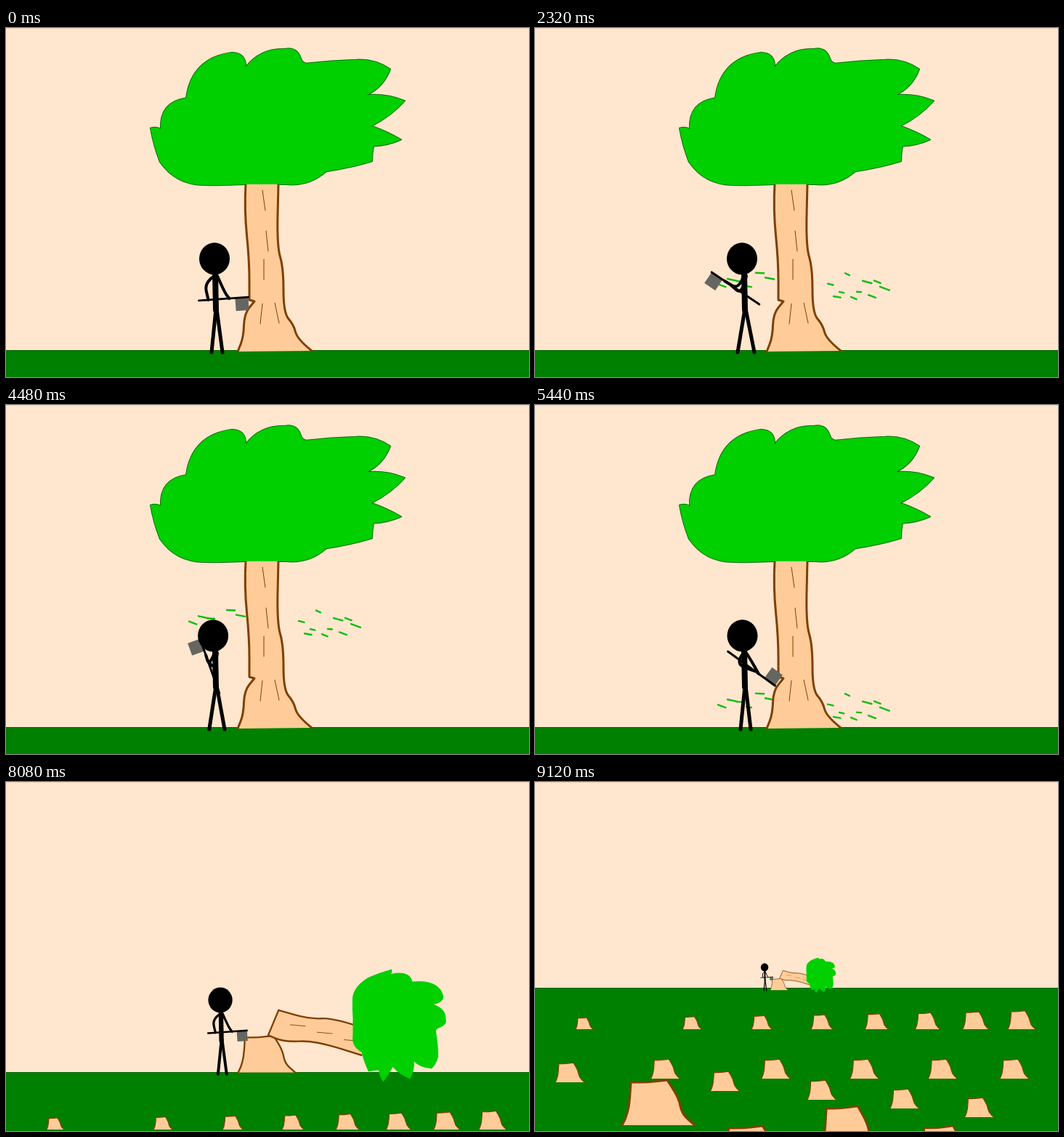
These frames come from a looping animation (720 by 480 pixels, 9200 ms). An HTML page with a canvas:

```html
<!DOCTYPE html>
<html lang="en">
<head>
<meta charset="utf-8">
<title>Chopping a tree</title>
<style>
html, body { margin: 0; width: 100%; height: 100%; overflow: hidden; background: #ffe6cf; }
canvas { display: block; }
</style>
</head>
<body>
<canvas id="stage" width="720" height="480"></canvas>
<script>
const g = document.getElementById('stage').getContext('2d');
const LOOP = 9200, STEP = 80, CHOP = 1280, FALL = 5722, ZOOM = 7680;
const BROWN = '#7f4000', WOOD = '#ffcc99', LEAF = '#00cf00';
const rad = Math.PI / 180;
const clamp = v => Math.max(0, Math.min(1, v));
const mix = (a, b, k) => a.map((v, i) => v + (b[i] - v) * k);
const rnd = n => { const v = Math.sin(n * 12.9898) * 43758.5453; return v - Math.floor(v); };

// Corners of the crown, clockwise, each with the bulge of the edge leading to it.
const crown = bulgePath([
  [199,137,0], [213,138,.2], [248,95,.45], [311,32,.38], [330,52,.5], [383,27,.25], [406,40,.45],
  [413,47,-.3], [482,42,.02], [529,55,.17], [497,91,.2], [549,99,.12], [503,134,.1], [544,153,.05],
  [506,162,.1], [504,183,-.05], [441,197,.04], [385,215,.22], [330,215,0], [274,216,.02],
  [212,184,.27], [199,137,.05]]);

const trunkLeft = [330,214, 328,250, 335,320, 335,374, 335,374, 342,376, 342,376, 328,393, 327,425, 319,445];
const trunkRight = [421,444, 401,428, 396,408, 382,392, 382,330, 373,300, 375,214];
const log = [515,284, 455,295, 418,319, 364,332, 364,332, 370,379, 370,379, 400,375, 444,347, 528,328];
const stumpEdge = [0,1, .09,.75, .12,.05, .12,.05, .35,.05, .62,0, .62,0, .78,.4, .82,.75, 1,1];

// head x, feet x, hands along the handle, elbows, axe: centre, angle, length, blade side
const ready = [287, 283, 298, -21, 8, 273, 350, 301, 364, 299.5, 372.5, -4, 68, 1];
const drawn = [285.5, 283, 297, 6, 12, 275, 356, 298, 352, 298, 362.5, 36, 80, -1];
const raised = [285, 279, 302, 18, 7, 281, 360, 285, 367, 276, 358, -146, 79, -1];

function bulgePath(points) {
  const path = new Path2D();
  points.forEach(([x, y, bulge], i) => {
    if (!i) return path.moveTo(x, y);
    const [px, py] = points[i - 1];
    path.quadraticCurveTo((px + x) / 2 + bulge * (y - py), (py + y) / 2 - bulge * (x - px), x, y);
  });
  return path;
}

// Smooth curve through the middles of the point list; a doubled point is a corner.
function trace(p) {
  const n = p.length;
  g.lineTo(p[0], p[1]);
  for (let i = 2; i < n - 2; i += 2)
    g.quadraticCurveTo(p[i], p[i + 1], (p[i] + p[i + 2]) / 2, (p[i + 1] + p[i + 3]) / 2);
  g.lineTo(p[n - 2], p[n - 1]);
}

function line(p, width, color = '#000') {
  g.beginPath();
  trace(p);
  g.lineWidth = width;
  g.strokeStyle = color;
  g.stroke();
}

function fill(color, ...parts) {
  g.beginPath();
  parts.forEach(trace);
  g.fillStyle = color;
  g.fill();
}

function around(x, y, change, paint) {
  g.save();
  g.translate(x, y);
  change();
  g.translate(-x, -y);
  paint();
  g.restore();
}

function stump(mid, base, w, h = w * .67) {
  const p = stumpEdge.map((v, i) => i % 2 ? base - h + v * h : mid + (v - .5) * w);
  fill(WOOD, p);
  line(p, Math.max(1.2, w * .03), BROWN);
}

function standingTrunk() {
  fill(WOOD, trunkLeft, trunkRight);
  line(trunkLeft, 3, BROWN);
  line(trunkRight, 3, BROWN);
  for (const [x, y, lean] of [[353,223,4], [358,279,3], [355,318,0], [353,379,-3], [370,378,6]])
    line([x, y, x + lean, y + 28], 1, BROWN);
}

function fallenLog() {
  fill(WOOD, log);
  line(log, 3, BROWN);
  for (let i = 0; i < 3; i++) {
    const x = 394 + 47 * i, y = 344 - 12 * i;
    line([x, y, x + 24, y - 11], 1, BROWN);
  }
}

function tree(t) {
  const tilt = t < FALL ? 0 : Math.min(101.5, 1.02e-4 * (t - FALL) ** 2);
  const u = tilt / 71.6, squash = clamp((t - 6560) / 160);

  // The crown rides on the trunk, lags behind it and flattens on the ground.
  const withCrown = paint => {
    g.save();
    g.translate(371 - 9 * u * u, 379 - 16 * u * u);
    g.rotate(tilt * rad);
    g.translate(-19, -164);
    g.rotate(-2.8 * u ** 4 * rad);
    g.transform(1 - .04 * Math.min(u, 1) - .4 * squash, 0, .15 * squash, .99 - .13 * squash, 0, 0);
    g.translate(-352, -215);
    paint();
    g.restore();
  };

  if (squash < 1) withCrown(() => {
    g.lineWidth = 2;
    g.strokeStyle = '#0a6e0a';
    g.stroke(crown);
  });
  if (tilt) {
    stump(367.5, 443, 99, 64);
    around(371, 379, () => g.rotate((tilt - 71.6) * rad), fallenLog);
  } else standingTrunk();
  withCrown(() => {
    g.fillStyle = LEAF;
    g.fill(crown);
  });
}

function fallingLeaves(t) {
  for (let k = 0; k < 3; k++) {
    const age = t - 1200 - k * 1268;
    if (age < 0 || age > 1820) continue;
    const dy = -200 + .2286 * age - 4.46e-5 * age * age;
    for (let i = 0; i < 16; i++) {
      const x = i < 6 ? 252 + 13 * i : 403 + 8 * (i - 6);
      const y = 330 + 40 * rnd(i + 3) + dy;
      const len = 5 + 9 * rnd(i + 40), slope = .5 * rnd(i + 80);
      line([x, y, x + len, y + len * slope], 2.4, '#10bd10');
    }
  }
}

// 0 ready, 1 drawn back, 2 raised
function swing(t) {
  if (t >= 5760) return 0;
  if (t >= 5440) return t >= 5680 ? 1.5 : 1 + clamp((t - 5440) / 160);
  const p = t % CHOP;
  if (p >= 1200) return 1.5;
  return p < 320 ? clamp((p - 80) / 240) : 1 + clamp((p - 320) / 400);
}

function man(t) {
  const k = swing(t);
  const [head, footL, footR, handL, handR, elx, ely, erx, ery, ax, ay, deg, len, side] =
    k < 1 ? mix(ready, drawn, k) : mix(drawn, raised, k - 1);
  const grip = d => [ax + d * Math.cos(deg * rad), ay + d * Math.sin(deg * rad)];

  around(ax, ay, () => g.rotate(deg * rad), () => {
    g.fillStyle = '#666660';
    g.fillRect(ax + len / 2 - 18, ay, 18, 18 * side);
    line([ax - len / 2, ay, ax + len / 2, ay], 3);
  });
  line([288, 338, 289, 388], 8);
  line([289, 386, footL, 446], 5);
  line([290, 386, footR, 446], 5);
  line([287, 341, elx, ely, ...grip(handL)], 4);
  line([291, 341, erx, ery, ...grip(handR)], 4);
  g.beginPath();
  g.ellipse(head, 317.3, 21, 22, 0, 0, 7);
  g.fillStyle = '#000';
  g.fill();
}

// Three rows, larger towards the front.
function clearing() {
  const spread = (i, n, from, width, power) => from + width * (i / (n - 1)) ** power;
  for (let i = 0; i < 8; i++) stump(spread(i, 8, 68, 602, .72), 340, 24 + 2 * i);
  for (let i = 0; i < 10; i++) stump(spread(i, 10, 48, 612, .7), i % 2 ? 408 : 413 + 6 * i, 40);
  for (let i = 0; i < 4; i++) stump(170 + 132 * i, i % 2 ? 535 : 472 + 18 * i, 100 - 7 * i, 62);
}

function draw(t) {
  const z = clamp((t - ZOOM) / 1440), s = 1 - .75 * z;
  const horizon = Math.round(443 - 160 * z);
  const bar = (y, h, color) => {
    g.fillStyle = color;
    g.fillRect(0, y, 720, h);
  };
  bar(0, 480, '#ffe6cf');
  bar(0, 1, '#ead0b8');
  bar(horizon, 480 - horizon, '#008000');
  bar(horizon, 1, '#006000');

  around(325.7, 234, () => g.scale(s, s), () => {
    fallingLeaves(t);
    tree(t);
    man(t);
  });
  if (z > 0) around(0, 0, () => g.translate(0, 191 * (1 - z)), clearing);
}

g.lineCap = g.lineJoin = 'round';
const begin = performance.now();
function tick() {
  const t = (performance.now() - begin) % LOOP;
  draw(Math.floor(t / STEP) * STEP);
  requestAnimationFrame(tick);
}
tick();
</script>
</body>
</html>
```
